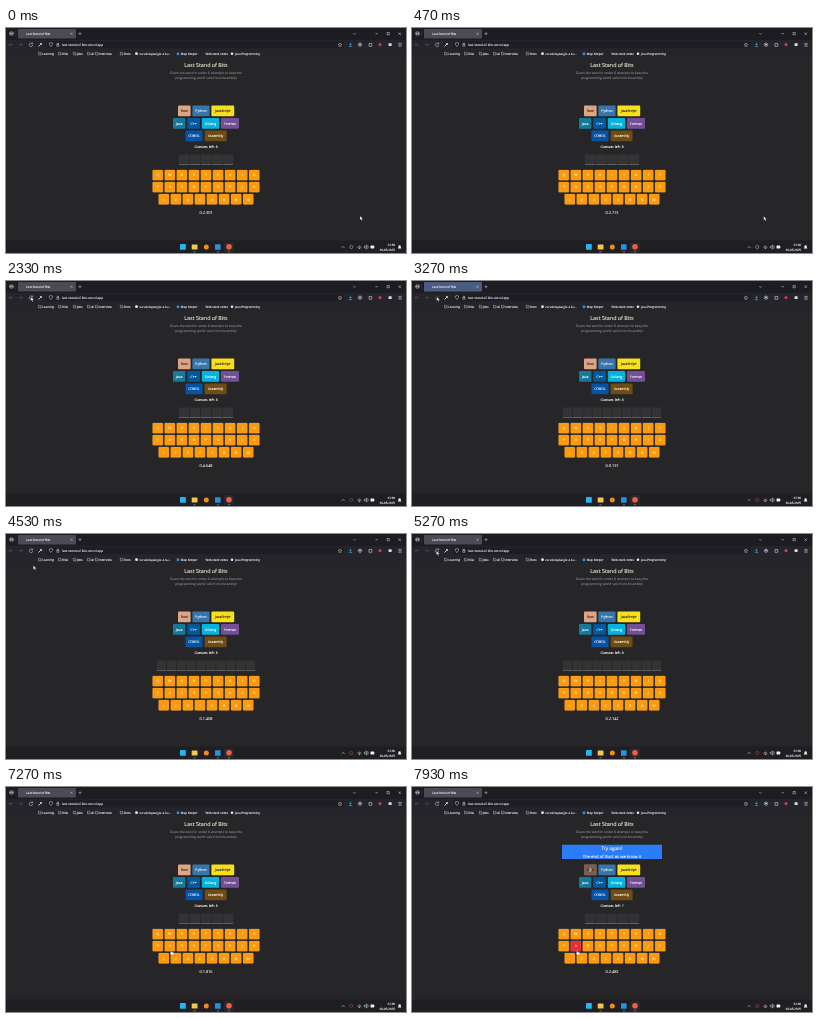
An HTML page for the animation above (8000 ms loop, 400 px wide and 225 px high).

```html
<!DOCTYPE html>
<html lang="en">
<head>
<meta charset="utf-8">
<title>Last Stand of Bits</title>
<style>
  html, body { margin: 0; width: 100%; height: 100%; overflow: hidden; background: #262527; }
  svg { display: block; width: 100vw; height: 100vh; }
  text { font-family: "Open Sans", "Noto Sans", sans-serif; white-space: pre; }
</style>
</head>
<body>
<svg id="stage" viewBox="0 0 400 225" text-rendering="geometricPrecision"></svg>
<script>
const stage = document.getElementById('stage');

function add(tag, attrs, parent = stage) {
  const el = document.createElementNS('http://www.w3.org/2000/svg', tag);
  for (const k in attrs) el.setAttribute(k, attrs[k]);
  return parent.appendChild(el);
}
const group = (parent) => add('g', {}, parent);
const rect = (x, y, width, height, fill, rx = 0, parent) =>
  add('rect', { x, y, width, height, fill, rx }, parent);
const dot = (cx, cy, r, fill, parent) => add('circle', { cx, cy, r, fill }, parent);
const line = (d, stroke = '#d5d5dc', width = 0.5, parent) =>
  add('path', { d, stroke, 'stroke-width': width, fill: 'none' }, parent);
// A hairline stroke keeps tiny text legible.
function label(str, x, y, size, fill = '#fff', anchor = 'middle', parent) {
  const el = add('text', { x, y, fill, stroke: fill, 'stroke-width': 0.1, 'font-size': size, 'text-anchor': anchor }, parent);
  el.textContent = str;
  return el;
}
const show = (el, on) => el.setAttribute('visibility', on ? 'visible' : 'hidden');

function drawBrowser() {
  const pale = '#f0f0f4';
  rect(0, 0, 400, 12, '#1d1c23');
  rect(0, 12, 400, 17, '#25242b');
  rect(0, 29, 400, 184, '#262527');
  rect(12, 1, 58, 9.6, '#4b4b56', 1);
  const tabGlow = rect(12, 1, 58, 9.6, '#4a70b8', 1);
  label('Last Stand of Bits', 20, 6.9, 3, pale, 'start');
  line('M4 4h3v3h-3z M3.5 5.5h4', pale);
  line('M9.8 3v5', '#55555f', 0.3);
  line('M64.5 4.7l2 2m0-2l-2 2 M72.5 5.7h3m-1.5-1.5v3', pale, 0.4);
  line('M347.3 5.2l1.2 1.2l1.2-1.2 M369.5 5.7h2.4 M381 4.5h2.3v2.3h-2.3z M392.5 4.5l2.4 2.4m0-2.4l-2.4 2.4', pale, 0.45);

  rect(41, 13.2, 297, 7, '#1e1d24', 1);
  line('M7 16.7h-4m1.6-1.6l-1.6 1.6l1.6 1.6 M12.5 16.7h4m-1.6-1.6l1.6 1.6l-1.6 1.6', '#5c5c66');
  const reload = line('M26.4 15.6a1.8 1.8 0 1 0 .4 1.5 M26.7 14.5v1.5h-1.5', '#d0d0d8');
  line('M32.5 18.5l2-2', pale, 0.8);
  dot(35, 16, 0.9, pale);
  line('M43.3 15l1.6-.5l1.6 .5v1.6l-1.6 2l-1.6-2z', pale, 0.45);
  line('M50.8 16.5h2.2v1.8h-2.2z M51.2 16.4v-1.2h1.4v1.2', pale, 0.45);
  label('last-stand-of-bits.vercel.app', 56, 17.9, 3.2, pale, 'start');
  line('M334 14.9l.6 1.2l1.3.2l-1 .9l.2 1.3l-1.1-.6l-1.1.6l.2-1.3l-1-.9l1.3-.2z', pale, 0.4);
  line('M344.5 14.7v2.5m-1.2-1l1.2 1.2l1.2-1.2 M342.8 18.6h3.4', '#43b9ec', 0.6);
  add('circle', { cx: 354, cy: 16.7, r: 1.7, fill: 'none', stroke: pale, 'stroke-width': 0.5 });
  dot(354, 16.5, 0.8, pale);
  line('M363 15.5h2.8v2.8h-2.8z', pale);
  dot(374, 16.6, 1.6, '#cf3a45');
  rect(382.5, 15.3, 3.2, 2.7, '#d8d8de', 0.4);
  line('M392.4 15.4h3.2m-3.2 1.4h3.2m-3.2 1.4h3.2', pale);

  const folders = [[32.5, 'Learning'], [52.5, 'DSA'], [67.3, 'Jobs'], [81.5, 'AI'], [89.5, 'Interview'], [114.3, 'Docs']];
  for (const [x, name] of folders) {
    line(`M${x} 24.3h1l.4 .5h1.3v2h-2.7z`, pale, 0.4);
    label(name, x + 3.7, 26.8, 2.95, pale, 'start');
  }
  dot(130.5, 25.7, 1.4, '#f0f0f3');
  label('norvik/daytangle: A bu...', 133.2, 26.8, 2.8, pale, 'start');
  dot(172, 25.7, 1.5, '#2d8fdc');
  label('Map Keeper', 174.8, 26.8, 2.95, pale, 'start');
  label('Web stack notes', 199.5, 26.8, 2.95, pale, 'start');
  dot(226, 25.7, 1.3, '#e8e8ec');
  label('Java Programming', 229, 26.8, 2.95, pale, 'start');
  return { tabGlow, reload };
}

function drawTaskbar() {
  const pale = '#f0f0f4';
  rect(0, 212.5, 400, 12.5, '#1f1e23');
  rect(217.9, 213.9, 10.2, 10, '#29282e', 1);
  rect(174, 216, 5.8, 5.8, '#25b5f2', 0.5);
  rect(185.7, 216.4, 5.8, 5, '#f3c64d', 0.5);
  dot(200.3, 219, 2.5, '#f28a1c');
  rect(209, 216.2, 5.6, 5.6, '#2493dc', 0.5);
  dot(223, 218.8, 2.8, '#f0603c');
  for (const x of [187.3, 210.8, 221.8]) rect(x, 223.6, 2.4, 0.6, '#8e8e9a', 0.3);
  line('M335.8 219.8l1.4-1.4l1.4 1.4', pale);
  line('M351.4 219.5q2-3 4 0m-3 .4q1-1.4 2 0', pale);
  dot(353.4, 220.6, 0.5, pale);
  line('M358.3 218.2h1l1.3-1.2v4l-1.3-1.2h-1z M361.7 217.5q1 1.5 0 3', pale);
  rect(364.5, 217.6, 3.6, 2.8, pale, 0.4);
  line('M368.4 218.5v1', pale);
  label('22:40', 389, 217.8, 2.95, pale, 'end');
  label('03-05-2025', 389, 222.9, 2.95, pale, 'end');
  add('path', { d: 'M391.8 220.5h3.6l-.6-.9v-1.1a1.2 1.2 0 0 0-2.4 0v1.1z', fill: pale });
  return add('circle', { cx: 345.3, cy: 219, r: 1.6, fill: 'none', 'stroke-width': 0.6 });
}

function drawChips() {
  const chips = [
    [172, 77.5, 12.6, 'Rust', '#dea584', '#222'],
    [186.4, 77.5, 17.2, 'Python', '#3776ab', '#fff'],
    [205.4, 77.5, 22.8, 'JavaScript', '#f7df1e', '#222'],
    [167, 90, 12.4, 'Java', '#17799a', '#fff'],
    [181.2, 90, 12.8, 'C++', '#00599c', '#fff'],
    [195.8, 90, 17.4, 'Golang', '#06b2de', '#fff'],
    [215, 90, 18, 'Fortran', '#734f96', '#fff'],
    [179.4, 102.5, 17.2, 'COBOL', '#0553a5', '#fff'],
    [198.6, 102.5, 22, 'Assembly', '#6e4c13', '#fff'],
  ];
  for (const [x, y, w, name, fill, ink] of chips) {
    rect(x, y, w, 10.7, fill, 0.9);
    label(name, x + w / 2, y + 6.6, 3.45, ink);
  }
}

function drawWord(count, pitch) {
  const g = group();
  const left = 200 - count * pitch / 2;
  for (let i = 0; i < count; i++) {
    const x = left + i * pitch + 0.3;
    rect(x, 126.5, pitch - 0.6, 10.3, '#333234', 0, g);
    rect(x, 136.4, pitch - 0.6, 0.4, '#a8a59a', 0, g);
  }
  return g;
}

function drawKeys() {
  const keys = {};
  const size = 10.4, pitch = 12.06;
  ['QWERTYUIO', 'PASDFGHJK', 'LZXCVBNM'].forEach((row, r) => {
    [...row].forEach((ch, i) => {
      const x = 200 + (i - (row.length - 1) / 2) * pitch;
      const y = 141.9 + r * pitch;
      keys[ch] = rect(x - size / 2, y, size, size, '#fd9a0c', 0.8);
      keys[ch].setAttribute('stroke', '#d7b483');
      keys[ch].setAttribute('stroke-width', 0.2);
      label(ch, x, y + 6.5, 3.5, '#fff3dc');
    });
  });
  return keys;
}

function drawLoss() {
  const g = group();
  rect(150, 57.7, 100, 14.4, '#2b7cf8', 0.4, g);
  label('Try again!', 200, 63.3, 4.7, '#fff', 'middle', g);
  label('The end of Rust as we know it', 200, 70.5, 4.25, '#fff', 'middle', g);
  rect(172, 77.5, 12.6, 10.7, 'rgba(30,30,32,.52)', 0.9, g);
  dot(178.3, 82.4, 1.5, '#b5aaa4', g);
  rect(177.5, 83.2, 1.6, 1.5, '#b5aaa4', 0.3, g);
  dot(177.7, 82.5, 0.4, '#333', g);
  dot(178.9, 82.5, 0.4, '#333', g);
  return g;
}

const { tabGlow, reload } = drawBrowser();
const recorder = drawTaskbar();
label('Last Stand of Bits', 200, 39.4, 5.4, '#f9f4da');
label('Guess the word in under 8 attempts to keep the', 200, 45.6, 3.25, '#85858a');
label('programming world safe from Assembly!', 200, 50.9, 3.25, '#85858a');
drawChips();
const guesses = label('', 200, 119.7, 3.45, '#f9f7ee');
const shortWord = drawWord(5, 11);
const longWord = drawWord(10, 9.9);
const keys = drawKeys();
const clock = label('', 200, 186.3, 3.9, '#f9f7ee');
const loss = drawLoss();

const cursor = group();
const pointer = (d) => add('path', { d, fill: '#fff', stroke: '#222', 'stroke-width': 0.25 }, cursor);
const arrow = pointer('M0 0v4l1-.9l.7 1.6l.7-.3l-.7-1.5h1.3z');
const hand = pointer('M0 0q.5-.4.8.2v1.6l2 .5q.5.2.3.9l-.5 1.6h-2.2l-1.4-2q.1-.6.8-.2z');

const FIRST_RELOAD = 3131, SECOND_RELOAD = 5470, MISS = 7600;
const path = [
  [0, 354, 188], [400, 354, 188], [930, 301, 196], [1330, 77.5, 120.5], [1730, 29, 24],
  [2000, 24.8, 16], [3330, 24.8, 16], [3900, 26, 25], [4400, 27.3, 31.5], [4700, 27.3, 31.5],
  [5200, 24.5, 17], [6130, 24.5, 17], [6900, 164.8, 163.3], [8000, 164.8, 163.3],
];
const elapsed = [
  [0, 2301], [1333, 3648], [FIRST_RELOAD - 1, 5445], [FIRST_RELOAD, 0], [3267, 137], [4533, 1408],
  [SECOND_RELOAD - 1, 2345], [SECOND_RELOAD, 0], [5800, 330], [7267, 1816], [7933, 2482], [8000, 2549],
];

function sample(table, t, ease = (u) => u) {
  const i = Math.max(1, table.findIndex((row) => row[0] >= t));
  const a = table[i - 1], b = table[i];
  const u = ease((t - a[0]) / (b[0] - a[0]));
  return a.slice(1).map((v, k) => v + (b[k + 1] - v) * u);
}
const smooth = (u) => u * u * (3 - 2 * u);

function render(t) {
  const [x, y] = sample(path, t, smooth);
  cursor.setAttribute('transform', `translate(${x} ${y})`);
  const overKey = t >= 6850;
  show(arrow, !overKey);
  show(hand, overKey);

  const ms = Math.round(sample(elapsed, t)[0]);
  clock.textContent = `0.${Math.floor(ms / 1000)}.${String(ms % 1000).padStart(3, '0')}`;

  // A fresh load tints the tab and disables the reload button for a moment.
  tabGlow.setAttribute('opacity', Math.max(0, 0.8 - ms / 400));
  reload.setAttribute('opacity', ms < 600 ? 0.25 : 1);

  const long = t >= FIRST_RELOAD && t < SECOND_RELOAD;
  show(longWord, long);
  show(shortWord, !long);

  const missed = t >= MISS;
  show(loss, missed);
  guesses.textContent = `Guesses left: ${missed ? 7 : 8}`;
  keys.A.setAttribute('fill', missed ? '#ee2b38' : '#fd9a0c');
  recorder.setAttribute('stroke', t < 500 ? '#a5a5ae' : '#a84450');
}

const STEP = 1000 / 15;
const start = performance.now();
function tick() {
  const t = Math.max(0, performance.now() - start) % 8000;
  render(Math.floor((t + 4) / STEP) * STEP % 8000);
  requestAnimationFrame(tick);
}
tick();
</script>
</body>
</html>
```
